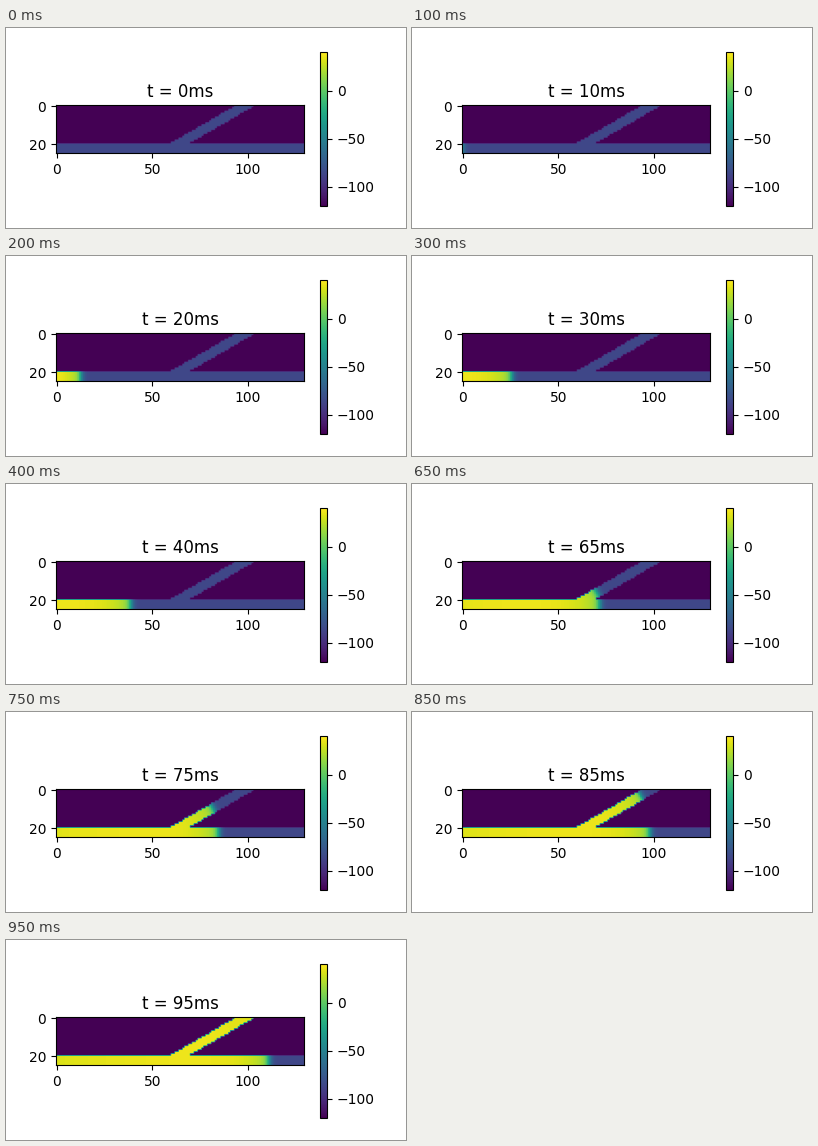
These frames come from a looping animation (400 px wide and 200 px high, 1000 ms). A matplotlib script:

```python
import numpy as np
import matplotlib.pyplot as plt
from matplotlib.animation import FuncAnimation

ROWS, COLS = 25, 130
STRAND_TOP = 20
FORK = 65              # column where the branch leaves the strand
BRANCH_LENGTH = 40
BRANCH_ANGLE = np.radians(30)
OUTSIDE, REST, PEAK = -120, -86.2, 40
ONSET, SPEED = 10.4, 1.31    # ms, cells per ms
FRAMES, STEP_MS = 20, 5

y, x = np.mgrid[:ROWS, :COLS]
branch_start = 60 + (STRAND_TOP - 1 - y) / np.tan(BRANCH_ANGLE)
strand = y >= STRAND_TOP
branch = ~strand & (x >= branch_start) & (x < branch_start + 10)
tissue = strand | branch

# Distance travelled by the front, and distance to the nearest sealed end
arc = (x - FORK) * np.cos(BRANCH_ANGLE) + (STRAND_TOP - y) * np.sin(BRANCH_ANGLE)
path = np.where(strand, x, FORK + arc)
to_end = np.where(strand, x, np.maximum(BRANCH_LENGTH - arc, 0))
arrival = ONSET + path / SPEED
boost = 2 * np.exp(-to_end / 6)


def potential(age):
    """Membrane potential in mV, age ms after activation."""
    upstroke = 1 / (1 + np.exp(-age / 0.7))
    since = np.maximum(age, 0)
    plateau = 39 - 0.08 * since - 28 * np.exp(-since / 8)
    return REST + upstroke * (plateau - REST)


def field(t):
    age = t - arrival
    age = age + boost * np.clip(age, 0, 8)   # sealed ends depolarise faster
    return np.where(tissue, potential(age), OUTSIDE)


fig, ax = plt.subplots(figsize=(4, 2), dpi=100)
image = ax.imshow(field(0), vmin=OUTSIDE, vmax=PEAK, cmap="viridis")
fig.colorbar(image)
title = ax.set_title("t = 0ms")


def update(frame):
    t = frame * STEP_MS
    image.set_data(field(t))
    title.set_text(f"t = {t}ms")
    return image, title


anim = FuncAnimation(fig, update, frames=FRAMES, interval=50, repeat=True)
plt.show()
```
